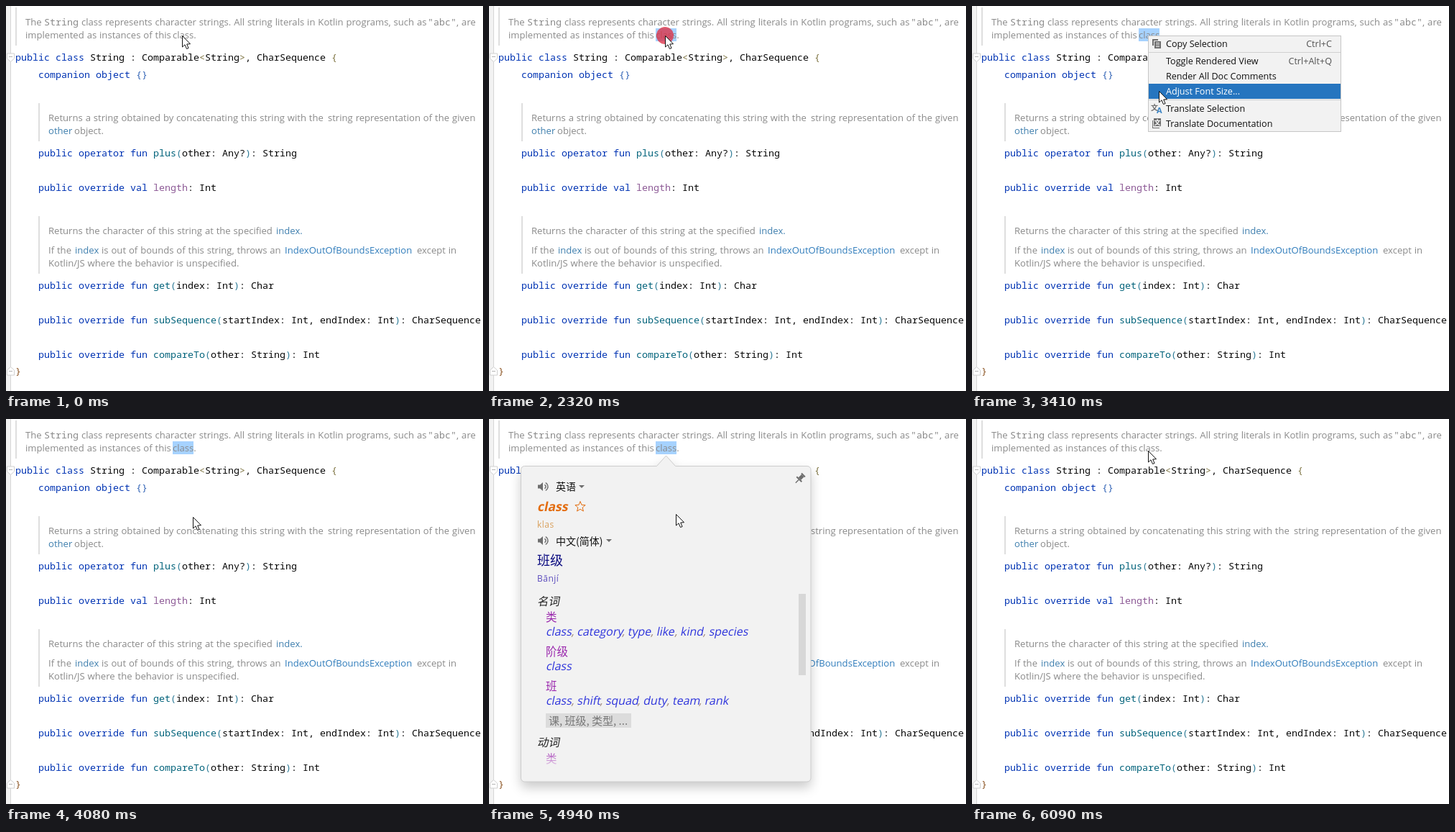
Animation, 664 px wide and 535 px high, one loop 7750 ms. Source, as an HTML page with a canvas:

```html
<!DOCTYPE html>
<html lang="en">
<head>
<meta charset="utf-8">
<title>Translate selection</title>
<style>
html, body { margin: 0; width: 100%; height: 100%; overflow: hidden; background: #fff; }
canvas { display: block; }
</style>
</head>
<body>
<canvas id="stage" width="664" height="535"></canvas>
<script>
const c = document.getElementById('stage').getContext('2d');
const LOOP = 7750;
const SANS = '"Open Sans", "Noto Sans", "Noto Sans CJK SC", sans-serif';
const CJK = '"Noto Sans CJK SC", "Noto Sans CJK", "Noto Sans CJK JP", sans-serif';
const MONO = '13.333px "Noto Sans Mono", "DejaVu Sans Mono", monospace';
const DOC = '13.1px ' + SANS;
const GRAY = '#8a8a8a', LINK = '#2f7cbb', PARAM = '#3f7fae', ICON = '#6e6e6e';

function rect(x, y, w, h, color) {
  c.fillStyle = color;
  c.fillRect(x, y, w, h);
}

function text(str, x, y, font, color, align = 'left') {
  c.font = font;
  c.fillStyle = color;
  c.textAlign = align;
  c.fillText(str, x, y);
}

function slanted(str, x, y, font, color) {
  c.save();
  c.transform(1, 0, -0.2, 1, x, y);
  text(str, 0, 0, font, color);
  c.restore();
}

function poly(points, fill, stroke) {
  c.beginPath();
  for (let i = 0; i < points.length; i += 2) c.lineTo(points[i], points[i + 1]);
  c.closePath();
  if (fill) { c.fillStyle = fill; c.fill(); }
  if (stroke) { c.strokeStyle = stroke; c.lineWidth = 1; c.stroke(); }
}

// ---- editor ----

const TOKEN = /(\b(?:public|class|companion|object|operator|override|fun|val)\b|(?<=fun )\w+|\blength\b|[<>(){}])/;

function tokenColor(s, prev, bracket) {
  if (/^[<>(){}]$/.test(s)) return bracket;
  if (s === 'length') return '#8d5a96';
  if (/^(public|class|companion|object|operator|override|fun|val)$/.test(s)) return '#0033b3';
  return prev === 'fun' ? '#00627a' : '#080808';
}

function code(line, x, y, bracket = '#2c7a96') {
  let prev = '';
  for (const s of line.split(TOKEN)) {
    if (!s) continue;
    text(s, x, y, MONO, tokenColor(s, prev, bracket));
    x += s.length * 8;
    if (s.trim()) prev = s;
  }
}

function doc(str, x, y, color = GRAY) {
  c.wordSpacing = '0.5px';
  text(str, x, y, DOC, color);
  c.wordSpacing = '0px';
}

function fold(y, dir) {
  poly([1.5, y - 5 * dir, 11.5, y - 5 * dir, 11.5, y + 2 * dir, 6.5, y + 6.5 * dir, 1.5, y + 2 * dir],
    '#fff', '#cfcfcf');
  rect(4, y - 1, 5, 1, '#b4b4b4');
}

function editor(selected) {
  rect(0, 0, 664, 535, '#fff');
  rect(0, 0, 6, 535, '#f2f2f2');
  rect(6, 0, 1, 535, '#d6d6d6');
  rect(13, 2, 2, 53, '#dedede');
  rect(45, 135, 2, 53, '#dedede');
  rect(45, 292, 2, 80, '#dedede');
  if (selected) rect(232, 31, 29, 18, '#a6d2ff');

  doc('The', 27, 27);
  text('String', 53, 27, MONO, GRAY);
  doc('class represents character strings. All string literals in Kotlin programs, such as', 105, 27);
  text('"abc"', 587, 27, MONO, GRAY);
  doc(', are', 627, 27);
  doc('implemented as instances of this', 27, 45);
  doc('class.', 232, 45);

  code('public class String : Comparable<String>, CharSequence {', 13, 76, '#7d7340');
  code('companion object {}', 45, 100, '#2f62b5');

  doc('Returns a string obtained by', 59, 160);
  doc('concatenating this string with the', 237, 160);
  doc('string representation of the given', 448, 160);
  doc('other', 59, 178, PARAM);
  doc('object.', 95, 178);
  code('public operator fun plus(other: Any?): String', 45, 209);
  code('public override val length: Int', 45, 257);

  doc('Returns the character of this string at the specified', 59, 317);
  doc('index.', 376, 317, PARAM);
  doc('If the', 59, 344);
  doc('index', 96, 344, PARAM);
  doc('is out of bounds of this string, throws an', 133, 344);
  doc('IndexOutOfBoundsException', 388, 344, LINK);
  doc('except in', 572, 344);
  doc('Kotlin/JS where the behavior is unspecified.', 59, 362);
  code('public override fun get(index: Int): Char', 45, 393);
  code('public override fun subSequence(startIndex: Int, endIndex: Int): CharSequence', 45, 441);
  code('public override fun compareTo(other: String): Int', 45, 489);
  code('}', 13, 512, '#8a5220');
  fold(71, 1);
  fold(508, -1);
}

// ---- context menu ----

const ITEMS = [
  ['Copy Selection', 42, 'Ctrl+C'],
  ['Toggle Rendered View', 66, 'Ctrl+Alt+Q'],
  ['Render All Doc Comments', 87],
  ['Adjust Font Size...', 108],
  ['Translate Selection', 132],
  ['Translate Documentation', 153]
];
const MENU_FONT = '12.6px ' + SANS;

function copyIcon(x, y, color, back) {
  rect(x, y, 8, 9, color);
  rect(x + 2, y + 2, 10, 11, back);
  rect(x + 3, y + 3, 9, 10, color);
  for (let i = 0; i < 3; i++) rect(x + 5, y + 5 + i * 2.5, 5, 1, back);
}

function docIcon(x, y) {
  rect(x + 2, y, 10, 11, ICON);
  rect(x, y + 3, 1, 11, ICON);
  rect(x, y + 13, 10, 1, ICON);
  text('文', x + 7, y + 9, 'bold 9px ' + CJK, '#fff', 'center');
}

function menu(p) {
  rect(245, 41, 269, 134, '#c6c6c6');
  rect(246, 42, 267, 132, '#f2f2f2');
  rect(246, 64, 267, 1, '#d0d0d0');
  rect(246, 130, 267, 1, '#d0d0d0');
  for (const [label, y, keys] of ITEMS) {
    const on = p.x > 245 && p.y >= y && p.y < y + 21;
    if (on) rect(246, y, 267, 21, '#2675bf');
    text(label, 270, y + 15, MENU_FONT, on ? '#fff' : '#111');
    if (keys) text(keys, 501, y + 15, MENU_FONT, on ? '#fff' : '#555', 'right');
    if (y === 42) copyIcon(251, 46, on ? '#fff' : ICON, on ? '#2675bf' : '#f2f2f2');
    if (y === 132) {
      text('文', 249, 145, 'bold 10px ' + CJK, on ? '#fff' : ICON);
      text('A', 257, 149, 'bold 11px ' + SANS, on ? '#fff' : '#3b84c4');
    }
  }
  docIcon(251, 156);
}

// ---- translation balloon ----

function balloonPath() {
  const l = 44.5, t = 65.5, r = 448, b = 504, k = 5;
  c.beginPath();
  c.moveTo(l + k, t);
  c.lineTo(233.5, t);
  c.lineTo(246.5, 51);
  c.lineTo(259.5, t);
  c.arcTo(r, t, r, b, k);
  c.arcTo(r, b, l, b, k);
  c.arcTo(l, b, l, t, k);
  c.arcTo(l, t, r, t, k);
  c.closePath();
}

function speaker(y) {
  poly([68, y - 2.5, 71, y - 2.5, 75, y - 6, 75, y + 6, 71, y + 2.5, 68, y + 2.5], ICON);
  c.strokeStyle = ICON;
  c.lineWidth = 1.4;
  for (const r of [3, 6]) {
    c.beginPath();
    c.arc(76, y, r, -1.1, 1.1);
    c.stroke();
  }
}

const dropArrow = (x, y) => poly([x, y, x + 8, y, x + 4, y + 4], ICON);

function star(x, y) {
  const pts = [];
  for (let i = 0; i < 10; i++) {
    const a = i * Math.PI / 5 - Math.PI / 2, r = i % 2 ? 3.3 : 7.5;
    pts.push(x + r * Math.cos(a), y + r * Math.sin(a));
  }
  poly(pts, null, '#e36d10');
}

function words(list, y) {
  const font = '16px ' + SANS;
  let x = 79;
  list.split(' ').forEach((w, i, all) => {
    slanted(w, x, y, font, '#2f35dc');
    x += c.measureText(w).width;
    if (i < all.length - 1) {
      slanted(',', x, y, font, '#a08a78');
      x += c.measureText(', ').width;
    }
  });
}

function pin() {
  c.save();
  c.translate(432.5, 83);
  c.rotate(Math.PI / 4);
  rect(-3.5, -8, 7, 2, ICON);
  rect(-2.5, -6, 5, 6, ICON);
  rect(-5, 0, 10, 2, ICON);
  rect(-0.7, 2, 1.4, 6, ICON);
  c.restore();
}

function balloon(alpha, pinned) {
  c.save();
  c.globalAlpha = alpha;
  balloonPath();
  c.save();
  c.shadowColor = 'rgba(0,0,0,.21)';
  c.shadowBlur = 16;
  c.shadowOffsetY = 8;
  c.fillStyle = '#f2f2f2';
  c.fill();
  c.restore();
  c.strokeStyle = '#cdcdcd';
  c.lineWidth = 1;
  c.stroke();

  const small = '12px ' + SANS, label = '14px ' + CJK, term = '15.5px ' + CJK;
  speaker(94);
  text('英语', 93, 99, label, '#111');
  dropArrow(125, 92);
  slanted('class', 67, 128, 'bold 17.6px ' + SANS, '#e36d10');
  star(127, 122);
  c.letterSpacing = '0.5px';
  text('klas', 67, 151, small, '#d9a05c');
  text('Bānjí', 67, 226, small, '#5b4bbd');
  c.letterSpacing = '0px';
  speaker(169);
  text('中文(简体)', 93, 174.5, label, '#111');
  dropArrow(163, 167);
  text('班级', 67, 203, '18px ' + CJK, '#0a0a80');

  slanted('名词', 67, 259, term, '#222');
  text('类', 79, 281, term, '#9a27ad');
  words('class category type like kind species', 301);
  text('阶级', 79, 329, term, '#9a27ad');
  words('class', 349);
  text('班', 79, 377, term, '#9a27ad');
  words('class shift squad duty team rank', 397);
  rect(79, 409, 119, 20, '#dcdcdc');
  text('课, 班级, 类型, ...', 83, 424.5, '15px ' + CJK, '#777');
  slanted('动词', 67, 455, term, '#222');
  const fade = c.createLinearGradient(0, 462, 0, 482);
  fade.addColorStop(0, '#a640b7');
  fade.addColorStop(1, '#e4cbe8');
  text('类', 79, 478, term, fade);

  rect(431, 243, 10, 113, '#d7d7d7');
  if (pinned) pin();
  c.restore();
}

// ---- pointer ----

const MOVES = [
  [2980, 245, 41], [3120, 243, 47], [3260, 250, 78], [3400, 260, 118], [3540, 261, 129], [3680, 260, 136],
  [4860, 260, 136], [4940, 260, 132], [5140, 258, 112], [5350, 249, 66], [5550, 245, 44]
];

function pointer(t) {
  if (t > 2980 && t < 3680) t = 2980 + Math.floor((t - 2980) / 70) * 70;
  if (t > 4940 && t < 5550) t = 4940 + Math.floor((t - 4940) / 68) * 68;
  if (t > 4280 && t < 4940) t = 4280;
  let a = MOVES[0];
  for (const b of MOVES) {
    if (t < b[0]) {
      const k = Math.max(0, (t - a[0]) / (b[0] - a[0] || 1));
      return { x: Math.round(a[1] + (b[1] - a[1]) * k), y: Math.round(a[2] + (b[2] - a[2]) * k) };
    }
    a = b;
  }
  return { x: a[1], y: a[2] };
}

function arrow({ x, y }) {
  c.save();
  c.translate(x + 0.5, y + 0.5);
  poly([0, 0, 0, 15.5, 3.5, 12.3, 6, 18, 8.6, 17, 6.2, 11.5, 11, 11.2], '#fff', '#111');
  c.restore();
}

function click({ x, y }, color) {
  c.fillStyle = color;
  c.beginPath();
  c.arc(x, y, 12, 0, 7);
  c.fill();
}

// ---- timeline ----

const YELLOW = 'rgba(236,226,20,.62)', RED = 'rgba(220,50,70,.78)';
const CLICKS = [
  [1060, 1120, YELLOW], [1260, 1390, YELLOW], [2320, 2390, RED],
  [3950, 4080, YELLOW], [5860, 6020, YELLOW]
];
const FADES = [[4140, 0.3], [4210, 0.7], [4280, 1], [5950, 0.62], [6020, 0.28], [6090, 0]];

function draw(t) {
  const p = pointer(t);
  editor(t >= 1260 && t < 5950);
  if (t >= 2450 && t < 4080) menu(p);
  let alpha = 0;
  for (const [at, a] of FADES) if (t >= at) alpha = a;
  if (alpha) balloon(alpha, t >= 4940 && p.y > 66);
  for (const [from, to, color] of CLICKS) {
    if (t >= from && t < to) click(p, color);
  }
  arrow(p);
}

const start = performance.now();
function tick() {
  draw((performance.now() - start) % LOOP);
  requestAnimationFrame(tick);
}
tick();
</script>
</body>
</html>
```
